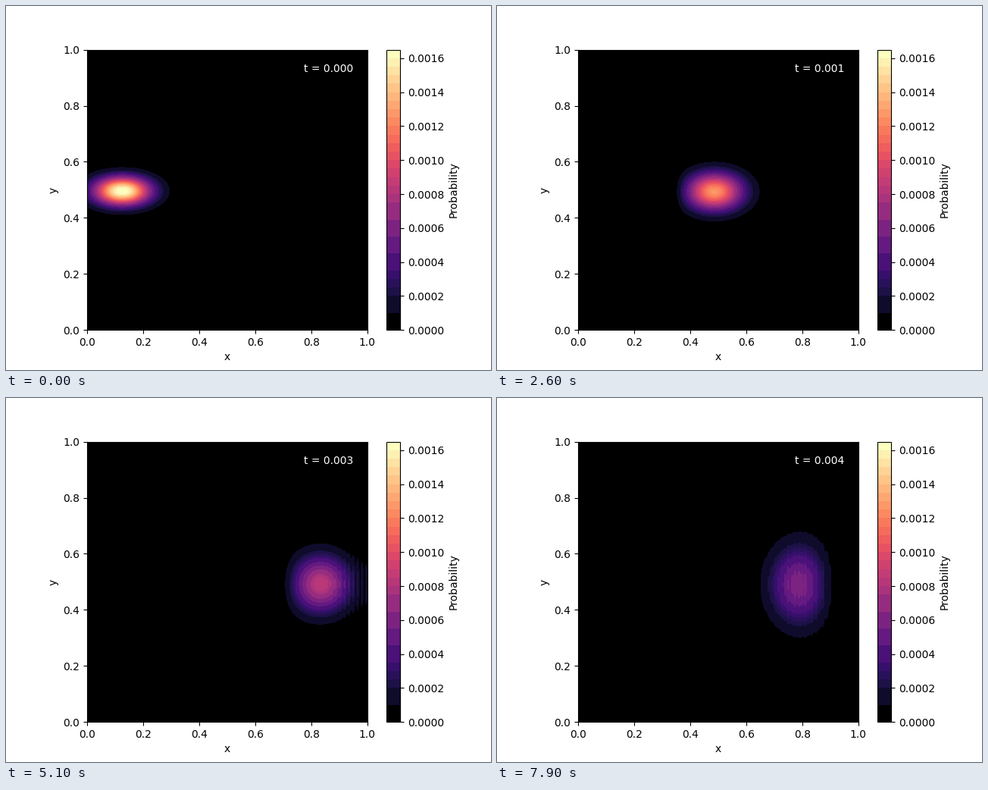
Recreate the animation shown at these times as a matplotlib script. Size 640x480 px, loop 8 s.

```python
import numpy as np
import matplotlib.pyplot as plt
from matplotlib.animation import FuncAnimation

FRAMES, INTERVAL = 80, 100
N = 200                     # grid points per side
DX = 1 / N
DT = 2.5e-5                 # Crank-Nicolson step
STEPS = 2                   # steps per frame
KX, KY = 200, -0.9
X0, Y0 = 0.125, 0.4957
SX, SY = 0.1, 0.05

axis = np.linspace(0, 1, N)
X, Y = np.meshgrid(axis, axis)

# Gaussian wave packet in a box
psi0 = np.exp(-(X - X0) ** 2 / (2 * SX ** 2) - (Y - Y0) ** 2 / (2 * SY ** 2))
psi0 = psi0 * np.exp(1j * (KX * X + KY * Y))
psi0 /= np.sqrt((np.abs(psi0) ** 2).sum())

# Sine modes diagonalise the finite-difference Laplacian
modes = np.arange(1, N + 1)
S = np.sqrt(2 / (N + 1)) * np.sin(np.pi * np.outer(modes, modes) / (N + 1))
energy = (2 - 2 * np.cos(np.pi * modes / (N + 1))) / DX ** 2
angle = 2 * np.arctan((energy[:, None] + energy[None, :]) * DT / 2)
coef = S @ psi0 @ S

levels = np.arange(34) * 5e-5


def probability(n):
    psi = S @ (coef * np.exp(-1j * angle * STEPS * n)) @ S
    return np.minimum(np.abs(psi) ** 2, levels[-1] * 0.9999)


def band_colors():
    colors = plt.get_cmap("magma")(np.linspace(0, 1, 33))
    # neighbouring dark bands share one tone
    for i in (2, 7, 9, 11, 13):
        colors[i:i + 2] = colors[i:i + 2].mean(axis=0)
    colors[:2] = (0, 0, 0, 1)
    return colors


colors = band_colors()
fig, ax = plt.subplots(figsize=(6.4, 4.8), dpi=100)
ax.set_facecolor("black")
ax.set_aspect("equal")


def draw_contours(n):
    return ax.contourf(X, Y, probability(n), levels=levels, colors=colors)


bar = fig.colorbar(draw_contours(0), ax=ax, ticks=np.arange(9) * 2e-4,
                   format="%.4f")
bar.set_label("Probability")
ax.set(xlim=(0, 1), ylim=(0, 1), xlabel="x", ylabel="y")
label = ax.text(0.95, 0.95, "", color="white", ha="right", va="top",
                transform=ax.transAxes)


def update(n):
    for c in list(ax.collections):
        c.remove()
    draw_contours(n)
    label.set_text(f"t = {n * 5e-5 + 1e-9:.3f}")
    return [label]


anim = FuncAnimation(fig, update, frames=FRAMES, interval=INTERVAL,
                     init_func=lambda: [label], repeat=True, repeat_delay=0)
plt.show()
```
